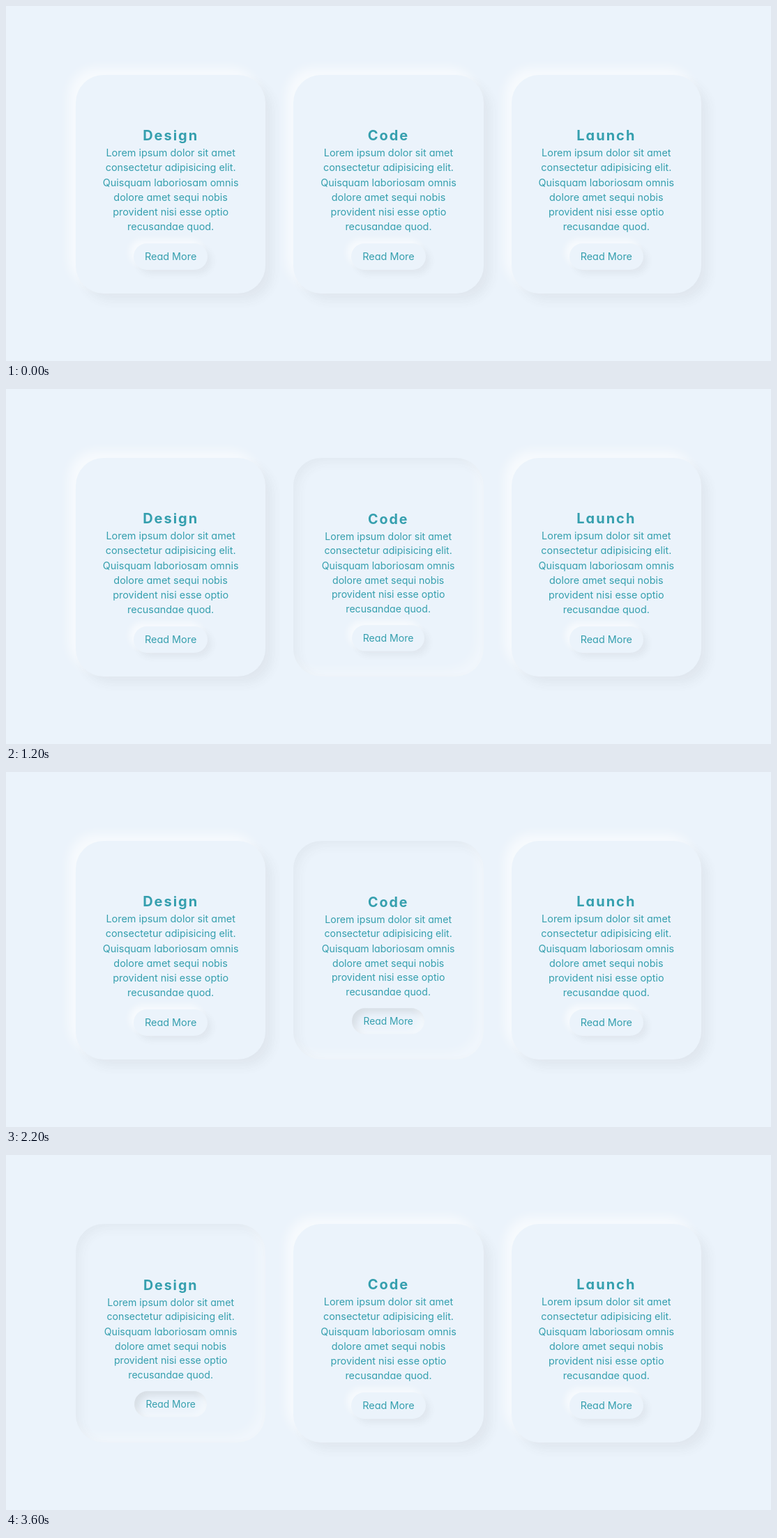
An HTML page that plays this animation: 1097x510 px, repeating every 4100 ms.

```html
<!DOCTYPE html>
<html lang="en">
<head>
<meta charset="utf-8">
<title>Soft cards</title>
<style>
  html, body { margin: 0; width: 100%; height: 100%; overflow: hidden; }
  body {
    position: relative;
    background: #ebf3fb;
    color: #359fae;
    font: 14.4px/21.25px Inter, "Open Sans", sans-serif;
    font-feature-settings: "cv11";
    text-align: center;
    white-space: nowrap;
  }
  .card, .content, .card h2, .card p, .button { position: absolute; margin: 0; }
  .card {
    top: 99px;
    width: 272.33px;
    height: 314.3px;
    border-radius: 40px;
    box-shadow: -10px -10px 15px rgba(255, 255, 255, .6),
                10px 10px 15px rgba(70, 70, 70, .065);
  }
  .card.pressed {
    box-shadow: inset -10px -10px 15px rgba(255, 255, 255, .3),
                inset 6px 6px 15px rgba(70, 70, 70, .055);
  }
  .content { inset: 0; }
  .pressed .content { transform: scale(.98); }
  .card h2 {
    top: 72px;
    width: 100%;
    font-size: 20px;
    line-height: 30px;
    font-weight: 700;
    letter-spacing: 2px;
  }
  .card p { top: 101.1px; width: 100%; }
  .button {
    left: 82.9px;
    top: 242px;
    width: 106.5px;
    height: 38px;
    line-height: 38px;
    border-radius: 19px;
    box-shadow: -6px -6px 10px rgba(255, 255, 255, .6),
                6px 6px 10px rgba(70, 70, 70, .065);
  }
  .button span { display: block; }
  .button.pressed {
    box-shadow: inset -6px -6px 10px rgba(255, 255, 255, .4),
                inset 6px 6px 10px rgba(70, 70, 70, .12);
  }
  .button.pressed span { transform: scale(.98); }
</style>
</head>
<body>
<script>
const LOOP = 4100;
const NONE = -1, DESIGN = 0, CODE = 1, LAUNCH = 2;

// [start in ms, pressed card, button pressed too]
const steps = [
  [0, NONE, false],
  [300, CODE, false],
  [700, DESIGN, false],
  [1200, CODE, false],
  [1400, NONE, false],
  [1500, LAUNCH, false],
  [1800, LAUNCH, true],
  [2100, LAUNCH, false],
  [2200, CODE, true],
  [2700, CODE, false],
  [3100, CODE, true],
  [3500, NONE, false],
  [3600, DESIGN, true]
];

const lines = [
  "Lorem ipsum dolor sit amet", "consectetur adipisicing elit.",
  "Quisquam laboriosam omnis", "dolore amet sequi nobis",
  "provident nisi esse optio", "recusandae quod."
];

const cards = ["Design", "Code", "Launch"].map((title, i) => {
  const card = document.createElement("div");
  card.className = "card";
  card.style.left = 100 + i * 312.33 + "px";
  card.innerHTML = `<div class="content"><h2>${title}</h2><p>${lines.join("<br>")}</p>
    <div class="button"><span>Read More</span></div></div>`;
  document.body.append(card);
  return { card, button: card.querySelector(".button") };
});

function draw(now) {
  const time = now % LOOP;
  const [, active, buttonDown] = steps.filter(([start]) => start <= time).pop();
  cards.forEach(({ card, button }, i) => {
    card.classList.toggle("pressed", i === active);
    button.classList.toggle("pressed", i === active && buttonDown);
  });
}

const begin = performance.now();
function frame() {
  draw(performance.now() - begin);
  requestAnimationFrame(frame);
}
frame();
</script>
</body>
</html>
```
